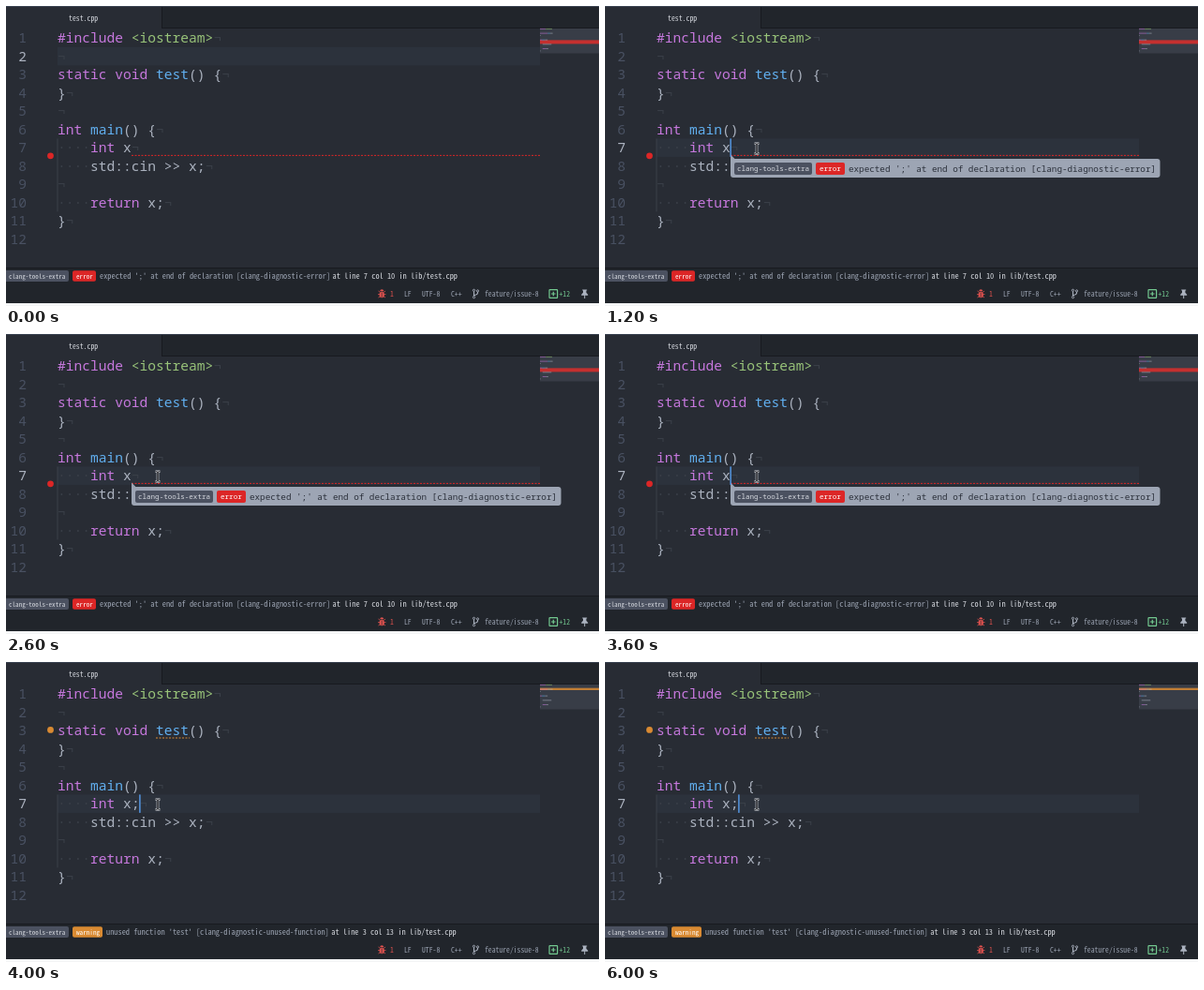
These frames come from a looping animation (633 by 320 pixels, 6200 ms). An HTML page:

```html
<!DOCTYPE html>
<html lang="en">
<head>
<meta charset="utf-8">
<title>Editor lint demo</title>
<style>
html, body { margin: 0; width: 100%; height: 100%; overflow: hidden; background: #282c34; }
svg { display: block; width: 633px; height: 320px; }
text { white-space: pre; font-family: "Noto Sans Mono CJK JP", "Noto Sans Mono CJK SC", "Noto Sans Mono", monospace; }
.code { font-family: "Noto Sans Mono", monospace; }
</style>
</head>
<body>
<svg id="stage" viewBox="0 0 633 320"></svg>
<script>
const LOOP = 6200, STEP = 200;
const SIZE = 14.6, CHAR = SIZE * 0.6, LEFT = 55, ROW = 19.5, TOP = 24.4;
const C = {
  bg: '#282c34', panel: '#21252b', edge: '#181a1f', row: '#2c323c', text: '#abb2bf', dim: '#495162',
  faint: '#3b4049', purple: '#c678dd', green: '#98c379', blue: '#61afef', caret: '#569cec',
  red: '#dc2626', orange: '#d98a32', badge: '#4b5160', tip: '#9da5b4', light: '#d7dae0',
  add: '#73c990', bug: '#e0524f'
};
const stage = document.getElementById('stage');

function add(tag, attrs, parent = stage) {
  const el = document.createElementNS('http://www.w3.org/2000/svg', tag);
  for (const k in attrs) el.setAttribute(k, attrs[k]);
  parent.append(el);
  return el;
}
const group = () => add('g', {});
const rect = (x, y, width, height, fill, parent, rx = 0) => add('rect', { x, y, width, height, fill, rx }, parent);
const line = (x1, y1, x2, y2, stroke, parent, more) => add('line', { x1, y1, x2, y2, stroke, ...more }, parent);
const dot = (cx, cy, r, fill, parent) => add('circle', { cx, cy, r, fill }, parent);
const path = (d, attrs, parent) => add('path', { d, fill: 'none', ...attrs }, parent);
function label(x, y, str, size, fill, parent, more) {
  const el = add('text', { x, y, fill, 'font-size': size, ...more }, parent);
  el.textContent = str;
  return el;
}
const show = (el, on) => el.setAttribute('visibility', on ? 'visible' : 'hidden');
const rowY = n => TOP + (n - 1) * ROW;
const baseY = n => rowY(n) + 14.6;

// Each run is [colour, text].
function code(n, runs, parent) {
  const el = add('text', { x: LEFT, y: baseY(n), 'font-size': SIZE, class: 'code' }, parent);
  for (const [color, str] of runs) add('tspan', { fill: C[color] }, el).textContent = str;
}

const pad = ['faint', '····'], eol = ['faint', '¬'];
const int = ['purple', 'int'];
const program = {
  1: [['purple', '#include '], ['green', '<iostream>'], eol],
  2: [eol],
  3: [['purple', 'static void '], ['blue', 'test'], ['text', '() {'], eol],
  4: [['text', '}'], eol],
  5: [eol],
  6: [int, ['blue', ' main'], ['text', '() {'], eol],
  8: [pad, ['text', 'std::cin >> x;'], eol],
  9: [eol],
  10: [pad, ['purple', 'return'], ['text', ' x;'], eol],
  11: [['text', '}'], eol]
};

// Editor
rect(0, 0, 633, 320, C.bg);
const active = rect(LEFT, 0, 570 - LEFT, ROW, C.row);
line(55, rowY(7), 55, rowY(11), C.faint);
const numbers = [];
for (let n = 1; n <= 12; n++)
  numbers[n] = label(22, baseY(n), n, SIZE, C.dim, stage, { 'text-anchor': 'end', class: 'code' });
for (const n in program) code(+n, program[n]);

// Tab bar
rect(166, 0, 467, 24, C.panel);
line(166, 23.5, 633, 23.5, C.edge);
line(166.5, 0, 166.5, 24, C.edge);
line(0, 0.5, 633, 0.5, '#3a4351');
label(67, 15.8, 'test.cpp', 7.8, C.light);

// Minimap
rect(570, 24, 63, 26.5, '#383d47');
const mapY = n => 23.9 + (n - 1) * 2.35;
function mapMarks(parent) {
  for (const n in program) {
    let x = 570;
    for (const [color, str] of program[n]) {
      const w = str.length * 0.68;
      if (color !== 'faint') rect(x, mapY(n), w, 1, C[color], parent).setAttribute('opacity', 0.55);
      x += w;
    }
  }
}

// Bottom panels
rect(0, 279, 633, 39, C.panel);
line(0, 279.5, 633, 279.5, C.edge);
rect(0, 317, 633, 3, '#f4f5f6');
rect(-3, 282, 70, 12, C.badge, stage, 2);
label(3, 290.6, 'clang-tools-extra', 7.1, C.light);

function statusMessage(parent, kind, color, width, text, place, placeX) {
  rect(71, 282.2, width, 11.6, color, parent, 2);
  label(75, 290.6, kind, 7.16, '#fff', parent);
  label(75 + width, 291, text, 8.36, '#9da5b4', parent);
  label(placeX, 291, place, 8.36, C.light, parent);
}

path('M397.5 304l1.8 1.4M405 304l-1.8 1.4M397 307.6h8.5M397.5 311l1.8-1.3M405 311l-1.8-1.3',
  { stroke: C.bug, 'stroke-width': 0.8 });
add('ellipse', { cx: 401.2, cy: 308, rx: 2.6, ry: 3.3, fill: C.bug });
path('M399.2 304.2a2 2 0 0 1 4 0z', { fill: C.bug });
line(401.2, 305.5, 401.2, 311, C.panel, stage, { 'stroke-width': 0.6 });
[[410, '1', C.bug], [425, 'LF'], [444, 'UTF-8'], [475, 'C++'], [511, 'feature/issue-8'], [590.5, '+12', C.add]]
  .forEach(([x, str, color = '#9da5b4']) => label(x, 309.6, str, 7.7, color));
path('M499.5 304v6M503.5 304.5v1.5q0 1.8-4 2.6', { stroke: C.text, 'stroke-width': 1.1 });
for (const [cx, cy] of [[499.5, 303.3], [503.5, 303.9], [499.5, 310.6]])
  add('circle', { cx, cy, r: 1.1, fill: C.panel, stroke: C.text, 'stroke-width': 0.9 });
add('rect', { x: 580, y: 302.7, width: 8.6, height: 8.6, rx: 0.6, fill: 'none', stroke: C.add, 'stroke-width': 1.2 });
path('M582 307h4.6M584.3 304.7v4.6', { stroke: C.add, 'stroke-width': 1.2 });
path('M615.2 302.5h5v1h-.8v2.2l1.8 2v1h-3v3.3h-1v-3.3h-3v-1l1.8-2v-2.2h-.8z', { fill: C.text });

// State with a missing semicolon
const broken = group();
code(7, [pad, int, ['text', ' x'], eol], broken);
line(134, 159.4, 570, 159.4, C.red, broken, { 'stroke-dasharray': '2 1.5' });
dot(47.5, 159.8, 3.4, C.red, broken);
rect(570, 36.4, 63, 4, '#c5302f', broken);
mapMarks(broken);
statusMessage(broken, 'error', C.red, 25, "expected ';' at end of declaration [clang-diagnostic-error]",
  'at line 7 col 10 in lib/test.cpp', 348.5);

// State with an unused function
const fixed = group();
code(7, [pad, int, ['text', ' x;'], eol], fixed);
line(160, 81, 196, 81, C.orange, fixed, { 'stroke-dasharray': '2 1.5' });
dot(47.5, 72.4, 3.4, C.orange, fixed);
rect(570, 27.7, 63, 2.3, '#c27f35', fixed);
mapMarks(fixed);
statusMessage(fixed, 'warning', C.orange, 32, "unused function 'test' [clang-diagnostic-unused-function]",
  'at line 3 col 13 in lib/test.cpp', 347.3);

// Tooltip
const tip = group();
const mono = { class: 'code' };
path('M134 158.5v10h8v-5.5h-3.5z', { fill: C.tip }, tip);
rect(134, 163, 458.5, 20, C.tip, tip, 3);
rect(138, 167, 83, 13, C.badge, tip, 2);
label(141, 176.2, 'clang-tools-extra', 7.55, C.light, tip, mono);
rect(225, 167, 31, 13, C.red, tip, 2);
label(229, 176.2, 'error', 7.6, '#fff', tip, mono);
label(260, 176.6, "expected ';' at end of declaration [clang-diagnostic-error]", 9.27, '#2b303a', tip, mono);

const caret = rect(0, 0, 1.4, ROW, C.caret);

// Pointer, centred on its own origin
const pointer = group();
const beam = 'M-2.4-5.2h1.4q1 0 1 1v8.4q0 1-1 1h-1.4M2.4-5.2h-1.4q-1 0-1 1v8.4q0 1 1 1h1.4';
path(beam, { stroke: '#e8eaee', 'stroke-width': 2.6 }, pointer);
path(beam, { stroke: '#14171c', 'stroke-width': 1 }, pointer);

const CLICK = 1200, TYPE = 4000;
// Times at which the caret toggles, starting hidden.
const blinks = [400, 800, 1200, 1600, 2000, 2400, 2800, 3200, 3600, 4400, 4800, 5200, 5600];
const trail = [[400, 178, 72], [600, 174, 96], [800, 167, 130], [1000, 162, 152]];

function draw(now) {
  const t = Math.floor((now % LOOP) / STEP) * STEP;
  const row = t < CLICK ? 2 : 7;
  const done = t >= TYPE;
  show(broken, !done);
  show(fixed, done);
  show(tip, row === 7 && !done);
  active.setAttribute('y', rowY(row));
  for (let n = 1; n <= 12; n++) numbers[n].setAttribute('fill', n === row ? C.text : C.dim);
  const col = row === 2 ? 0 : done ? 10 : 9;
  caret.setAttribute('x', LEFT - 0.4 + col * CHAR);
  caret.setAttribute('y', rowY(row));
  show(caret, blinks.filter(b => b <= t).length % 2);
  const spot = trail.filter(p => p[0] <= t).pop();
  show(pointer, spot);
  if (spot) pointer.setAttribute('transform', `translate(${spot[1]} ${spot[2]})`);
}

const start = performance.now();
function tick() {
  draw(performance.now() - start);
  requestAnimationFrame(tick);
}
tick();
</script>
</body>
</html>
```
